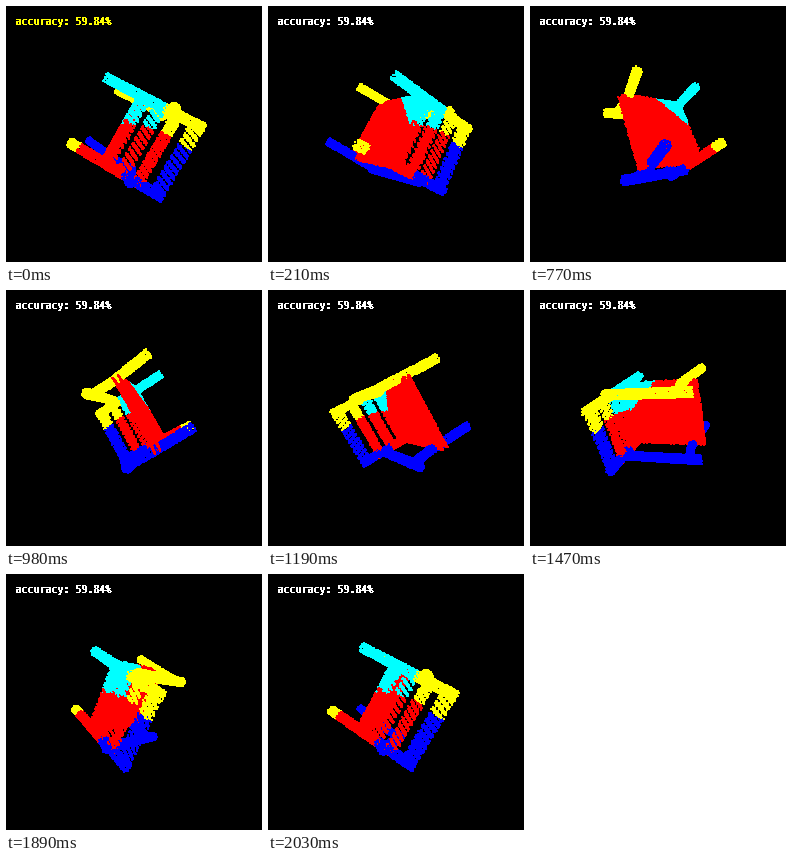
Write a matplotlib script that moves like this. It is 256 by 256 pixels and loops after 2100 ms.

```python
import numpy as np
import matplotlib.pyplot as plt
from matplotlib.animation import FuncAnimation

SIZE, DPI, FRAMES, STEP = 256, 100, 30, 70
CENTER, CAMERA = 128, 220
RED, YELLOW, BLUE, CYAN = (1, 0, 0), (1, 1, 0), (0, 0, 1), (0, 1, 1)

rng = np.random.default_rng(4)
points, colors = [], []


def vec(*xyz):
    return np.array(xyz, float)


def spread(n):
    """Evenly scattered pairs in the unit square, one row per coordinate."""
    ratio = vec(0.7548776662, 0.5698402910)
    return ((np.outer(ratio, np.arange(n)) + rng.random((2, 1))) % 1)


def paint(n, *bands):
    """Colour n samples from (mask, colour) bands, later bands on top."""
    cols = np.zeros((n, 3))
    for mask, color in bands:
        cols[mask] = color
    return cols


def tube(a, b, r, *stops, density=0.42):
    """Points on a cylinder; stops are (start fraction, colour)."""
    axis = b - a
    length = np.linalg.norm(axis)
    n = int(2 * np.pi * r * length * density)
    t, turn = spread(n)
    p = np.cross(axis, vec(1, 2, 3))
    p /= np.linalg.norm(p)
    q = np.cross(axis, p) / length
    turn = turn * 2 * np.pi
    side = np.outer(np.cos(turn), p) + np.outer(np.sin(turn), q)
    points.append(a + np.outer(t, axis) + r * side)
    colors.append(paint(n, *[(t >= start, color) for start, color in stops]))


def slab(origin, e1, e2, thick, color_of, density=0.4):
    """Points on the two faces of a flat board."""
    normal = np.cross(e1, e2)
    area = np.linalg.norm(normal)
    normal /= area
    for face in (-0.5, 0.5):
        u, v = spread(int(area * density))
        points.append(origin + np.outer(u, e1) + np.outer(v, e2)
                      + face * thick * normal)
        colors.append(color_of(u, v))


def split(limit, first, second):
    return lambda u, v: paint(len(u), (u >= 0, second), (u < limit, first))


def seat_color(u, v):
    return paint(len(u), (u >= 0, RED), (u + v < 0.45, CYAN))


# Back: two posts joined by a top rail and three slats.
foot = vec(-25, -53, 30)
rise = vec(83, 46, 15)
across = vec(-36, 62, -4)
inset = 0.05 * across
post1, post2 = foot + inset, foot + across - inset
tube(post1 + 0.03 * rise, post1 + rise, 4, (0, CYAN), (0.61, YELLOW))
tube(post2 + 0.03 * rise, post2 + rise, 4,
     (0, YELLOW), (0.11, RED), (0.59, BLUE))

for lo, hi, limit, first, second in [
        (0.875, 1.0, 0.33, YELLOW, BLUE),
        (0.70, 0.80, 0.30, YELLOW, RED),
        (0.535, 0.645, 0.33, CYAN, RED),
        (0.37, 0.485, 0.38, CYAN, RED)]:
    slab(foot + lo * rise, across, (hi - lo) * rise, 4,
         split(limit, first, second))

# Seat.
slab(vec(8, -35, 36), across, vec(0, 0, -76), 5, seat_color, density=0.6)

# Arms and front legs.
for shift, color in [(vec(0, 0, 0), YELLOW), (vec(-36, 61, -3), BLUE)]:
    front, back = vec(33, -21, -40), vec(33, -21, 42)
    tube(front + shift, back + shift, 4.2, (0, color))
    tip = vec(-21, -52, -41) + (vec(-34, 59, -1) if color == BLUE else 0)
    knee, top = vec(16, -31, -27) + shift, vec(33, -21, -28) + shift
    tube(tip, knee, 3.7, (0, color))
    tube(knee, top, 3.7, (0, color))

cloud, rgb = np.vstack(points), np.vstack(colors)


def project(angle):
    x, y, z = cloud.T
    c, s = np.cos(angle), np.sin(angle)
    px, depth = x * c + z * s, z * c - x * s
    scale = CAMERA / (CAMERA - depth)
    xy = np.column_stack([px * scale, y * scale]) + CENTER
    order = np.argsort(depth)
    return np.round(xy[order]), rgb[order]


fig = plt.figure(figsize=(SIZE / DPI, SIZE / DPI), dpi=DPI, facecolor="black")
ax = fig.add_axes([0, 0, 1, 1])
ax.set(xlim=(0, SIZE), ylim=(SIZE, 0))
ax.axis("off")
xy0, rgb0 = project(0)
dots = ax.scatter(xy0[:, 0], xy0[:, 1], s=(2 * 72 / DPI) ** 2, c=rgb0,
                  marker="s", linewidths=0, antialiased=False)

# Struck twice, one pixel apart, for heavy stems.
labels = [ax.text(x, 19, "accuracy: 59.84%", family="DejaVu Sans Mono",
                  size=10 * 72 / DPI, va="baseline", antialiased=False)
          for x in (9, 10)]


def draw(i):
    xy, cols = project(2 * np.pi * i / FRAMES)
    dots.set_offsets(xy)
    dots.set_facecolor(cols)
    for label in labels:
        label.set_color("yellow" if i == 0 else "white")
    return dots, *labels


anim = FuncAnimation(fig, draw, frames=FRAMES, interval=STEP,
                     repeat=True, repeat_delay=0)
plt.show()
```
